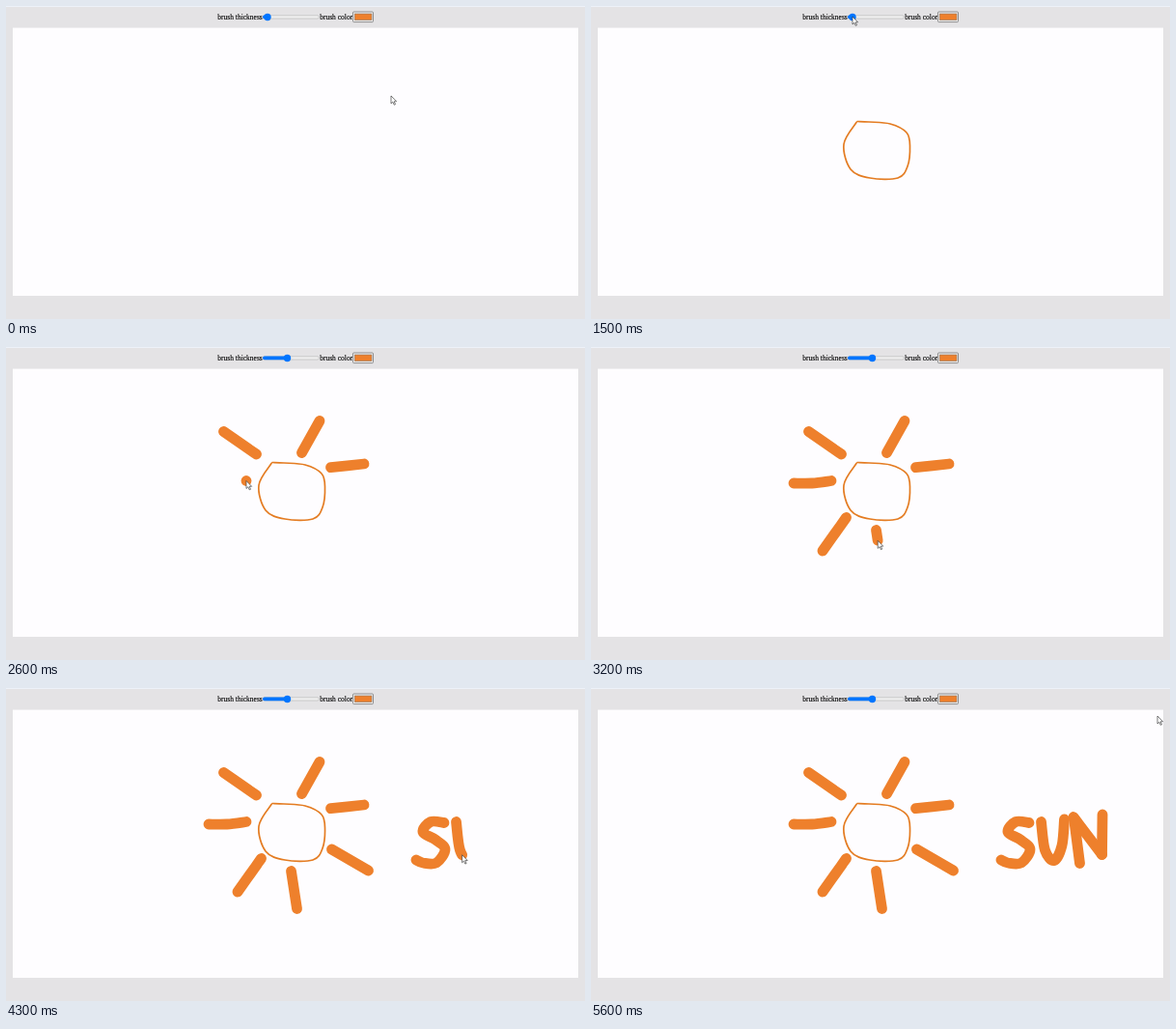
These frames come from a looping animation (600x324 px, 5.7 s). An HTML page:

```html
<!DOCTYPE html>
<html lang="en">
<head>
<meta charset="utf-8">
<title>Paint canvas</title>
<style>
  html, body { margin: 0; width: 100%; height: 100%; overflow: hidden; background: #e4e3e5; }
  svg { display: block; }
  text { font: 7.5px "Liberation Serif", "Times New Roman", serif; stroke: #000; stroke-width: .12; }
  #ink { fill: none; stroke-linecap: round; stroke-linejoin: round; }
</style>
</head>
<body>
<svg width="600" height="324" viewBox="0 0 600 324">
  <rect width="600" height="1" fill="#edf1f9"/>
  <rect x="7" y="22.6" width="586" height="277.4" fill="#fefdff"/>

  <text x="219.3" y="13.8">brush thickness</text>
  <rect x="266.3" y="9.8" width="58" height="3.2" rx="1.6" fill="#efefef" stroke="#b2b2b2" stroke-width=".6"/>
  <rect id="fill" x="266" y="9.6" height="3.6" rx="1.8" fill="#0075ff"/>
  <circle id="thumb" cy="11.5" r="3.7" fill="#0075ff"/>

  <text x="325.2" y="13.8">brush color</text>
  <rect x="359.5" y="6" width="21" height="10.6" rx="1" fill="#efefef" stroke="#777" stroke-width=".8"/>
  <rect x="361.2" y="8" width="17.8" height="6.6" fill="#ee802c" stroke="#8a7a6c" stroke-width=".6"/>

  <g id="ink"></g>
  <path id="cursor" d="M0 0V8L1.9 6.3L3.2 9.3L4.5 8.8L3.2 5.8H5.6Z" fill="#fff" stroke="#333" stroke-width=".65"/>
</svg>
<script>
const LOOP = 5700, STEP = 100, SPEED = 0.48;   // speed in px per ms
const THIN = { width: 1.7, color: '#e47c22' }, THICK = { width: 10.8, color: '#ee802c' };
const $ = id => document.getElementById(id);

// Catmull-Rom curve through a few points, as cubic Bezier segments.
function curve(points) {
  const p = points.split(' ').map(s => s.split(',').map(Number));
  const at = i => p[Math.max(0, Math.min(p.length - 1, i))];
  const handle = (i, side) => at(i).map((v, k) => v + side * (at(i + 1)[k] - at(i - 1)[k]) / 6);
  return 'M' + p[0] + p.slice(1).map((q, i) => `C${handle(i, 1)} ${handle(i + 1, -1)} ${q}`).join('');
}

// One pointer action; without a brush the pointer only moves.
function action(start, points, brush) {
  const path = document.createElementNS('http://www.w3.org/2000/svg', 'path');
  path.setAttribute('d', curve(points));
  if (brush) {
    path.setAttribute('stroke-width', brush.width);
    path.setAttribute('stroke', brush.color);
    $('ink').append(path);
  }
  const length = path.getTotalLength();
  return { start, path, brush, length, end: start + length / SPEED };
}

const drag = action(1500, '271,11 291.5,11');
const actions = [
  action(0, '399,93'),
  action(200, '450,100'),
  action(500, '275,120.5 262,143 269,169 289,178 318,178 328,166 330.5,145 327,131 310,122 288,120 276,119.5', THIN),
  drag,
  action(1700, '348,60'),
  // Rays
  action(1926, '306.5,109.5 325,76.5', THICK),
  action(2110, '336.5,124.7 371,121', THICK),
  action(2345, '259.5,111 225.5,87.5', THICK),
  action(2600, '249,138.5 229,141 210,141', THICK),
  action(2956, '264.5,176.5 240,211', THICK),
  action(3177, '295.5,189.5 301.5,228.5', THICK),
  action(3420, '337.5,167 375.5,189', THICK),
  action(3600, '449,147'),
  // Letters S, U, N
  action(3750, '454,139.5 440,138.5 432,149 445,157 455,167 446,181 432,181 425,178', THICK),
  action(4120, '485,132'),
  action(4227, '466.5,138.5 470.5,168 480,178.5 488,163 490.5,136', THICK),
  action(4690, '500.5,135 506.5,181.5', THICK),
  action(4910, '500,133.5 529.5,172.5', THICK),
  action(5120, '529.5,172.5 530,131', THICK),
  action(5400, '561,145'),
  action(5600, '587,29')
];

const progress = (a, t) => Math.max(0, Math.min(1, (t - a.start) / (a.end - a.start || 1)));
const along = (a, p) => a.path.getPointAtLength(a.length * p);

function pointer(t) {
  const i = actions.findLastIndex(a => a.start <= t);
  const now = actions[i], next = actions[i + 1];
  if (t < now.end) return along(now, progress(now, t));
  const from = along(now, 1);
  if (!next) return from;
  const to = along(next, 0), p = (t - now.end) / (next.start - now.end);
  return { x: from.x + (to.x - from.x) * p, y: from.y + (to.y - from.y) * p };
}

function draw(ms) {
  const t = Math.floor(ms % LOOP / STEP) * STEP;
  for (const a of actions.filter(a => a.brush)) {
    const p = progress(a, t);
    a.path.style.display = t >= a.start ? '' : 'none';
    a.path.style.strokeDasharray = p < 1 ? `${a.length * p} 999` : 'none';
  }
  const { x } = along(drag, progress(drag, t));
  $('thumb').setAttribute('cx', x);
  $('fill').setAttribute('width', x - 266);
  const tip = pointer(t);
  $('cursor').setAttribute('transform', `translate(${tip.x} ${tip.y})`);
}

const began = performance.now();
function tick() {
  draw(performance.now() - began);
  requestAnimationFrame(tick);
}
tick();
</script>
</body>
</html>
```
